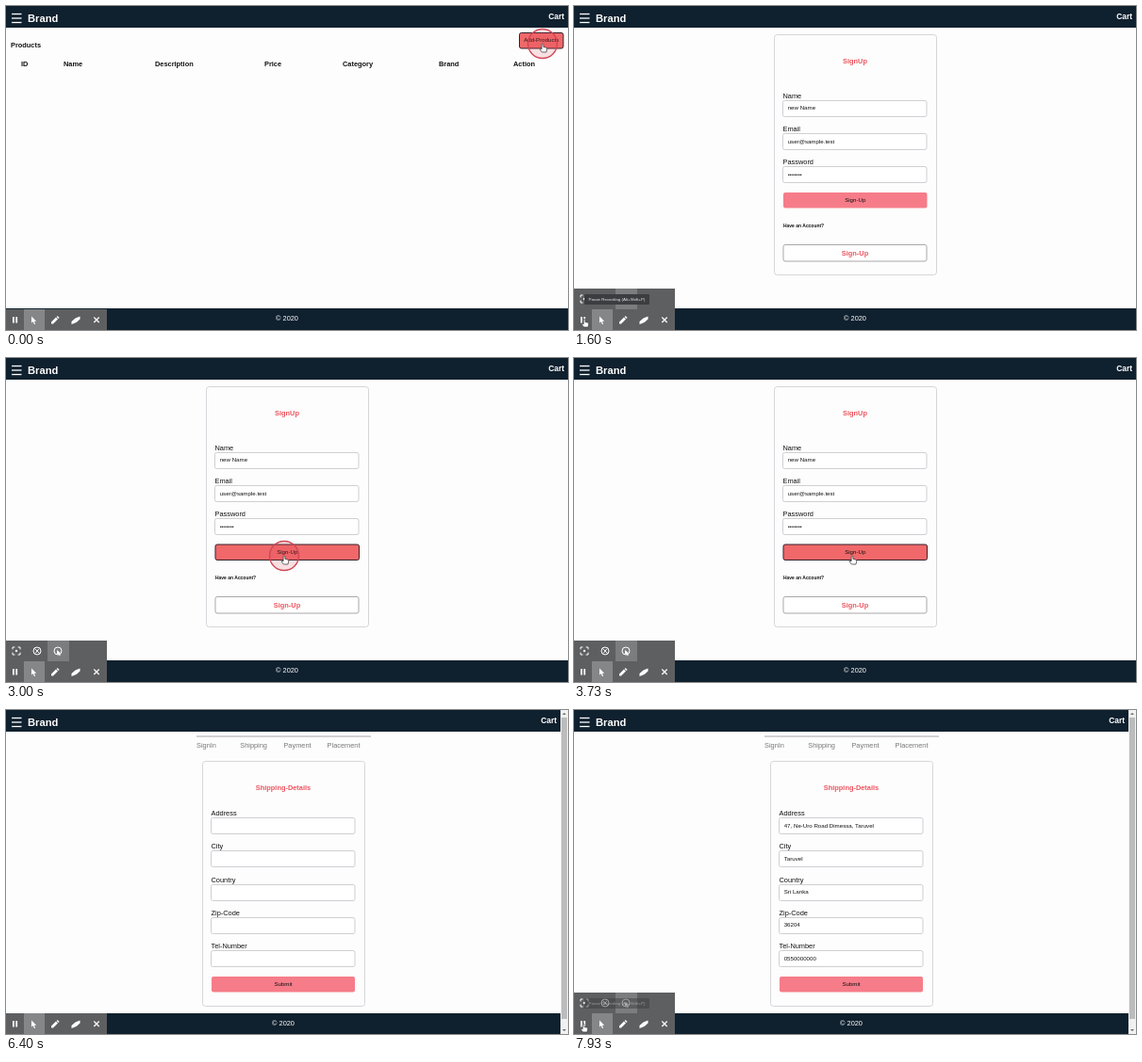
These frames come from a looping animation (596x344 px, 8 s). An HTML page with a canvas:

```html
<!DOCTYPE html>
<html lang="en">
<head>
<meta charset="utf-8">
<title>Shop walkthrough</title>
<style>
html, body { margin: 0; width: 596px; height: 344px; overflow: hidden; background: #fdfdfd; }
canvas { display: block; }
</style>
</head>
<body>
<canvas id="stage" width="596" height="344"></canvas>
<script>
const c = document.getElementById('stage').getContext('2d');
const LOOP = 8000, NAVY = '#0f202e', PINK = '#f67c89', RED = '#f0686a', TITLE = '#ee545e', INK = '#111';
const FORM = 330, SIGNUP = 1270, BLANK = 5060, SHIPPING = 5600, FILLED = 7200;

const ARROW = new Path2D('M0 0V7.2L1.7 5.7L2.8 8.2L3.9 7.7L2.8 5.3H5Z');
const HAND = new Path2D('M-.9 .6Q0-.6 .9 .6V3.4L4.2 4.2Q5 4.5 4.7 6L4 9H-.6L-3 5.9Q-2.7 4.6-.9 5.8Z');

const clamp = v => Math.max(0, Math.min(1, v));
const between = (t, a, b) => t >= a && t < b;

function text(s, x, y, { size = 7.4, color = INK, bold = false, align = 'left' } = {}) {
  c.font = `${bold ? 'bold ' : ''}${size}px "Liberation Sans", Arial, sans-serif`;
  c.fillStyle = color;
  c.textAlign = align;
  c.textBaseline = 'middle';
  c.fillText(s, x, y);
}

function rect(x, y, w, h, fill, stroke, r = 0) {
  c.beginPath();
  c.roundRect(x, y, w, h, r);
  if (fill) { c.fillStyle = fill; c.fill(); }
  if (stroke) { c.strokeStyle = stroke; c.lineWidth = 1; c.stroke(); }
}

function line(points, color = '#fff', width = 1.2) {
  c.beginPath();
  points.forEach(([x, y], i) => i ? c.lineTo(x, y) : c.moveTo(x, y));
  c.strokeStyle = color;
  c.lineWidth = width;
  c.stroke();
}

function button(label, x, y, w, h, fill, border) {
  rect(x, y, w, h, fill, border, 2);
  text(label, x + w / 2, y + h / 2, { size: 6.15, align: 'center' });
}

function header(scroll) {
  rect(0, 0, 596, 23, NAVY);
  for (const y of [8.5, 13, 17.5]) line([[6, y], [16.5, y]], '#fff', 1.3);
  text('Brand', 23, 13.5, { size: 11.2, color: '#fff', bold: true });
  text('Cart', scroll ? 584 : 592, 11.5, { size: 8.4, color: '#fff', bold: true, align: 'right' });
}

function footer(scroll) {
  const y = scroll ? 322 : 321;
  rect(0, y, 596, 23, NAVY);
  text('© 2020', scroll ? 294 : 298, y + 11.3, { color: '#fff', align: 'center' });
}

function scrollbar(end) {
  rect(588, 0, 8, 344, '#f1f1f1');
  rect(589, 8, 6, end - 8, '#bcbcbc');
  for (const [y, d] of [[5, -2], [339, 2]]) {
    c.fillStyle = '#666';
    c.fill(new Path2D(`M590 ${y}h4l-2 ${d}z`));
  }
}

function form(x, top, height, title, titleY, labelY, labels, values = []) {
  rect(x + .5, top + .5, 172, height, null, '#d6d6da', 3);
  text(title, x + 86, titleY, { color: TITLE, bold: true, align: 'center' });
  labels.forEach((label, i) => {
    const y = labelY + i * 35.2, area = label === 'Description';
    text(label, x + 9.5, y);
    rect(x + 9.5, Math.round(y + 4) + .5, 152.5, 17, '#fff', area ? '#999' : '#cfcfd4', area ? 0 : 2);
    if (area) line([[x + 158.5, y + 20], [x + 160.5, y + 18]], '#888', .6);
    if (values[i]) text(values[i], x + 14.7, y + 13, { size: 6.15 });
  });
}

function products() {
  button('Add-Products', 544.5, 28.5, 46.5, 16.5, RED, '#33202a');
  text('Products', 5, 42, { bold: true });
  const heads = { ID: 16, Name: 61, Description: 158, Price: 274, Category: 357, Brand: 459, Action: 538 };
  for (const name in heads) text(name, heads[name], 61.5, { bold: true });
  header();
  footer();
}

function addProducts() {
  text('Products', 5, 42, { bold: true });
  button('Add-Products', 200.5, 28.5, 47, 16.5, PINK, '#33202a');
  form(411.5, 36, 330, 'Add-Products', 63.5, 100.5,
    ['Name', 'Description', 'Price', 'Category', 'Brand', 'Stocks Available']);
  button('Post-Products', 421.5, 309, 152, 16, PINK);
  rect(421.5, 335.5, 152, 17, '#f1f1f1', '#bbb', 2);
  text('Back', 497.5, 344, { color: '#999', align: 'center' });
  header(true);
  scrollbar(280);
}

function signUp(t) {
  form(212, 30, 255, 'SignUp', 59, 95.8, ['Name', 'Email', 'Password'],
    ['new Name', 'user@sample.test', '•••••••']);
  const hover = t >= 2500, focus = t >= 2850;
  button('Sign-Up', 222, 198, 152.5, 16.5, hover ? RED : PINK, focus && '#33202a');
  text('Have an Account?', 222, 234, { size: 4.95, bold: true });
  rect(222, 253.5, 152, 17.5, '#fff', '#a8a8a8', 2);
  text('Sign-Up', 298, 262.5, { color: TITLE, bold: true, align: 'center' });
  header();
  footer();
}

function shipping(filled) {
  line([[202, 28], [387, 28]], '#aaa3aa', 1);
  ['SignIn', 'Shipping', 'Payment', 'Placement'].forEach((s, i) =>
    text(s, 202 + i * 46.2, 38, { color: '#777' }));
  form(208, 54, 260, 'Shipping-Details', 82.5, 110.2,
    ['Address', 'City', 'Country', 'Zip-Code', 'Tel-Number'],
    filled ? ['47, Ne-Uro Road Dimessa, Taruvel', 'Taruvel', 'Sri Lanka', '36204', '0550000000'] : []);
  button('Submit', 218, 283, 152, 16.5, PINK);
  header(true);
  footer(true);
  scrollbar(328);
}

function toolbar(open, tip) {
  rect(0, 322, 107, 22, '#5d5f61');
  rect(19, 322, 22, 22, '#858688');
  rect(7, 330, 1.8, 6.5, '#fff');
  rect(10.3, 330, 1.8, 6.5, '#fff');
  c.fillStyle = '#fff';
  c.fill(new Path2D('M27 329.5v7l1.7-1.5 1.2 3 1.2-.5-1.2-2.8h2.3z'));
  c.fill(new Path2D('M48 337.5v-2l5-5 2 2-5 5zM53.6 329.9l1-1 2 2-1 1z'));
  c.fill(new Path2D('M69.5 335l4-3.5 5-2v3l-4 3.5-5 2z'));
  line([[93.3, 330.5], [98.7, 336]]);
  line([[98.7, 330.5], [93.3, 336]]);
  if (!open) return;

  rect(0, 300, 107, 22, '#5d5f61');
  rect(44, 300, 23, 22, '#7c7d7f');
  for (const [sx, sy] of [[-1, -1], [1, -1], [1, 1], [-1, 1]])
    line([[11 + sx * 4, 311 + sy * 1.6], [11 + sx * 4, 311 + sy * 4], [11 + sx * 1.6, 311 + sy * 4]], '#fff', 1);
  rect(9.8, 309.8, 2.4, 2.4, '#fff', null, 1.2);
  rect(29, 307, 8, 8, null, '#fff', 4);
  line([[30.3, 308.3], [35.7, 313.7]], '#fff', 1);
  line([[35, 308.6], [31.2, 313.4]], '#fff', 1);
  rect(51, 307, 8, 8, null, '#fff', 4);
  c.fillStyle = '#fff';
  c.fill(new Path2D('M54 310v5l1.4-1 1.3 2.3 1-.5-1.2-2.3h1.7z'));
  if (tip > 0) {
    c.globalAlpha = tip;
    rect(11, 306, 69, 11, '#3b3d40', null, 1);
    text('Pause Recording (Alt+Shift+P)', 45.5, 311.7, { size: 4.4, color: '#eee', align: 'center' });
    c.globalAlpha = 1;
  }
}

// Pointer stops: time, x, y
const STOPS = [
  [0, 569, 40], [250, 569, 40], [700, 505, 103], [900, 505, 103], [1240, 11, 332],
  [1650, 11, 332], [2500, 295, 210], [5600, 295, 210]
];

function pointer(t) {
  let x = 10, y = 333;
  if (t < SHIPPING) {
    const i = STOPS.findIndex(s => s[0] > t);
    const [a, ax, ay] = STOPS[i - 1], [b, bx, by] = STOPS[i];
    const p = (t - a) / (b - a), k = p * p * (3 - 2 * p);
    x = ax + (bx - ax) * k;
    y = ay + (by - ay) * k;
  } else if (t < FILLED) return;

  if (t < FORM || between(t, 2850, 3400)) {
    c.beginPath();
    c.arc(x, y, 15.5, 0, 7);
    c.fillStyle = 'rgba(225,70,80,.16)';
    c.fill();
    c.strokeStyle = '#d04655';
    c.lineWidth = 1.4;
    c.stroke();
  }
  const hand = t < FORM || between(t, 1200, 1700) || between(t, 2480, BLANK) || t >= FILLED;
  const shape = hand ? HAND : ARROW;
  c.save();
  c.translate(x, y);
  c.lineWidth = .8;
  c.strokeStyle = '#444';
  c.fillStyle = '#fff';
  c.fill(shape);
  c.stroke(shape);
  c.restore();
}

function draw(now) {
  const t = now % LOOP;
  rect(0, 0, 596, 344, '#fdfdfd');
  if (t < FORM) products();
  else if (t < SIGNUP) addProducts();
  else if (t < BLANK) signUp(t);
  else if (t < SHIPPING) { header(); footer(); }
  else shipping(t >= FILLED);

  const open = between(t, 1200, 3900) || t >= FILLED;
  const tip = between(t, SIGNUP, 2000) ? clamp((1850 - t) / 150)
    : t >= FILLED ? clamp((LOOP - t) / 140) : 0;
  toolbar(open, tip);
  pointer(t);
  requestAnimationFrame(loop);
}

const start = performance.now();
function loop() { draw(performance.now() - start); }
loop();
</script>
</body>
</html>
```
